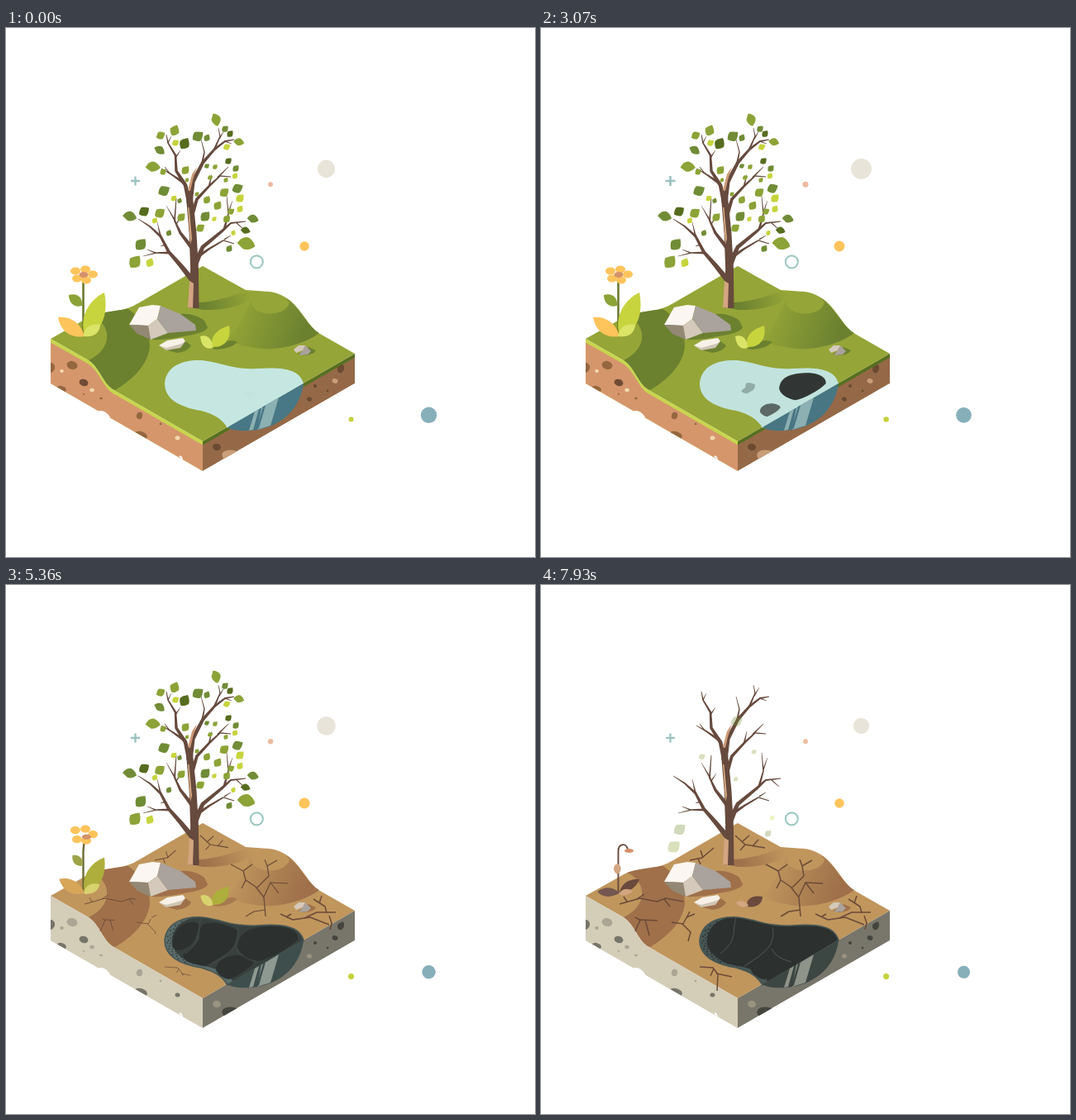
An HTML page for the animation above (8000 ms loop, 640 by 640 pixels).

```html
<!DOCTYPE html>
<html lang="en">
<head>
<meta charset="utf-8">
<title>Meadow turning to wasteland</title>
<style>
html, body { margin: 0; width: 100%; height: 100%; overflow: hidden; background: #fff; }
svg { display: block; width: 100vw; height: 100vh; }
</style>
</head>
<body>
<svg id="stage" viewBox="0 0 640 640"></svg>
<script>
const LOOP = 8000;
const stage = document.getElementById('stage');
const clamp = v => Math.max(0, Math.min(1, v));
const ramp = (t, from, to) => clamp((t - from) / (to - from));
const smooth = u => u * u * (3 - 2 * u);
const lerp = (a, b, u) => a + (b - a) * u;

function mix(a, b, u) {
  const rgb = h => [1, 3, 5].map(i => parseInt(h.slice(i, i + 2), 16));
  const to = rgb(b);
  return `rgb(${rgb(a).map((v, i) => Math.round(lerp(v, to[i], u)))})`;
}
function morph(a, b, u) {
  const to = b.match(/-?[\d.]+/g);
  let i = 0;
  return a.replace(/-?[\d.]+/g, n => lerp(+n, +to[i++], u).toFixed(2));
}

// healthy colour, dry colour
const land = {
  ground: ['#95a537', '#c0965d'], shade: ['#6b8130', '#9f704a'],
  soil: ['#d5966c', '#d4cdb8'], lip: ['#c8d54e', '#d4cdb8'],
  side: ['#956947', '#78766a'], sideLip: ['#56701f', '#78766a'],
  brown: ['#94673f', '#aaa594'], dark: ['#6f4b33', '#77756a'],
  cream: ['#f4d9ae', '#aaa594'], wasCream: ['#f4d9ae', '#77756a'], wasBrown: ['#94673f', '#77756a'],
  sideDark: ['#6b4a33', '#45453f'], sideLight: ['#c99e78', '#45453f'], sideDim: ['#6b4a33', '#9a9380']
};
// clear, spilled, stagnant
const pool = {
  water: ['#c6e7e1', '#8fa8a6', '#475654'],
  depth: ['#487785', '#42656b', '#3c4642'],
  stripe: ['#8cb1b3', '#8da5a3', '#8f948a']
};
const OIL = '#2c302f', BARK = '#664a3d';

const frontEdge = '54,376 L98,401 C114,410 117,432 132,439 L238,500';
const backEdge = 'L422,394 L379,369.5 C367,362 359,343 344,330 C329,317 308,319 290,317 L238,288 L172,326 C155,336 152,338 140,341 Q115,344 102,349Z';
const pondShape = 'M192,430 C194,408 215,401 237,402 C262,405 275,414 305,412 C333,410 355,412 360,430 L268,484 C262,474 254,468 236,463 C212,459 192,450 192,430Z';

const path = (d, fill, extra = '') => `<path d="${d}" fill="${fill}" ${extra}/>`;
const poly = (points, fill) => `<polygon points="${points}" fill="${fill}"/>`;
const oval = (x, y, rx, ry, fill, extra = '') =>
  `<ellipse cx="${x}" cy="${y}" rx="${rx}" ry="${ry}" fill="${fill}" ${extra}/>`;
const tint = name => `var(--${name})`;
const pebbles = list => list.map(([x, y, rx, ry, c]) =>
  oval(x, y, rx, ry, tint(c), `transform="rotate(15 ${x} ${y})"`)).join('');

const leftPebbles = pebbles([
  [54, 411, 5, 6, 'wasBrown'], [80, 408, 6.5, 5, 'brown'], [94, 429, 5.5, 4.2, 'dark'],
  [67.5, 415, 2.3, 2, 'cream'], [104, 438, 2.8, 2.2, 'cream'], [94, 443, 1.1, 1, 'brown'],
  [115, 448, 2, 1.2, 'brown'], [67, 437, 6, 4, 'wasBrown'], [161.5, 469, 3.6, 4.3, 'brown'],
  [187, 479, 1.4, 1.2, 'brown'], [163, 493, 8, 5, 'wasBrown'], [191, 486, 2, 2.6, 'soil'],
  [207.5, 496, 3, 2.5, 'wasCream']
]);
const rightPebbles = pebbles([
  [255, 507, 5, 4.2, 'sideDim'], [275, 519, 14, 8, 'sideLight'], [398, 427, 3.5, 2.8, 'sideLight'],
  [367, 449, 3, 2.6, 'sideDim'], [374, 433, 2.1, 2, 'sideDark'], [389, 439, 1.4, 1.4, 'sideDark'],
  [405, 412, 4, 5.5, 'sideDark']
]);

const blobs = [
  [316, 434, 'M280,436 C282,418 300,412 330,412.500 C345,414 354,420 353,429 C342,440 320,452 305,455 C290,452 280,444 280,436Z'],
  [278, 462, 'M254,464 C256,453 270,447 282,448 C295,450 300,454 299,458 C292,466 280,473 270,477 C262,476 254,470 254,464Z'],
  [252, 436, 'M240,410 C255,406 272,413 280,418 C279,432 276,440 268,446 C258,450 248,458 240,461 C225,459 214,455 214,448 C220,440 234,435 234,425 C234,416 236,412 240,410Z'],
  [217, 425, 'M201,435 C202,420 210,410 222,408 C232,407 235,410 233,415 C230,425 228,435 218,439 C210,443 202,443 201,435Z']
];
const seams = 'M236,403 C230,418 240,428 217,446 M280,414 C284,434 274,444 246,461 M279,440 Q284,451 303,456';

const cracks = [
  '332,398 347,405 368,402 391,411', '361,403 376,396 399,396', '388,397 386,389 372,380', '391,400 394,409 392,417',
  '379,385 382,376', '340,401 345,398',
  '272,338 287,346 290,357 302,365 312,378 314,401', '304,366 318,352 316,340 328,333', '312,377 320,360 341,361',
  '290,357 285,367', '314,393 300,395 290,401', '287,346 298,338', '320,360 330,373', '316,340 313,332',
  '235,303 247,314 271,318', '247,314 241,321', '256,316 263,308', '243,311 252,303',
  '180,333 195,330 209,318', '196,330 193,321', '190,331 193,338',
  '95,386 120,379 140,383 151,379 172,383', '116,380 125,374', '149,380 156,389', '104,383 100,377',
  '114,419 120,405 141,406', '126,405 131,424', '121,406 114,402',
  '158,408 172,410 180,395', '171,410 181,420 178,431', '176,402 186,398',
  '192,462 208,463 214,471 213,491', '212,470 231,474', '209,464 205,473'
];

// start width, end width, points
const branches = [
  [11, 8, '228,339 228,290 226,248 222,205'], [7, 1, '222,212 226,186 238,163 252,147 265,137 276,135'],
  [2.4, .6, '252,147 259,131 257,121'], [1.6, .5, '258,134 264,124'], [2.4, .6, '237,165 240,150 236,135'],
  [1.6, .5, '265,137 273,140'], [6, .8, '222,212 217,190 206,173 205,154 196,139 194,129'],
  [2, .5, '205,157 211,148'], [3.4, .7, '216,188 200,177 188,170'], [1.6, .5, '198,176 192,168'],
  [1.5, .5, '196,139 200,131'], [5, .8, '224,230 231,207 246,191 259,179 272,180'],
  [2, .5, '256,181 269,168'], [2, .5, '246,190 249,177'],
  [7, .8, '228,288 238,265 261,246 272,236 290,234'], [2.8, .7, '264,243 269,225 267,203'],
  [1.6, .5, '269,223 274,209'], [4, .8, '233,276 246,267 263,257 276,261'], [1.6, .5, '279,236 288,244'],
  [1.6, .5, '264,256 272,251'], [5, .8, '225,266 211,248 204,233 206,206'], [2, .5, '205,234 194,215'],
  [1.6, .5, '206,237 212,228'], [7, .8, '228,308 211,287 197,271 187,252 174,240 160,231'],
  [2, .5, '187,252 183,235'], [3, .7, '198,272 182,272 166,276'],
  [1.8, .5, '181,272 171,268'], [2, .5, '193,262 187,264']
];
function taper(w0, w1, text) {
  const pts = text.split(' ').map(p => p.split(',').map(Number));
  const left = [], right = [];
  pts.forEach(([x, y], i) => {
    const [ax, ay] = pts[Math.max(0, i - 1)], [bx, by] = pts[Math.min(pts.length - 1, i + 1)];
    const width = lerp(w0, w1, (i / (pts.length - 1)) ** .8);
    const k = width / 2 / Math.hypot(bx - ax, by - ay);
    left.push([x - (by - ay) * k, y + (bx - ax) * k]);
    right.unshift([x + (by - ay) * k, y - (bx - ax) * k]);
  });
  return poly(left.concat(right).map(p => p.map(v => v.toFixed(1))).join(' '), BARK);
}

// Leaves by start of fall: x, y, size, colour, and a tilt for the pointed ones
const leafColor = { g: '#718c36', m: '#8ca337', d: '#566c1f', l: '#c6d43d' };
const leafGroups = [
  [5460, '204,124,6,m 187,130,5,m 205,139,4,l 167,222,6,d 186,224,6,m 203,206,3.5,l 283,206,5,l 241,228,6,g 267,231,4.5,m 219,184,2.5,m 266,184,3,m'],
  [5800, '216,140,6.5,d 243,133,4,g 282,138,6.5,m,0 267,144,4,l 186,148,7,g,20 178,168,9,m,-10 150,228,8.5,g,0 264,199,5.5,m 269,161,4,d 278,170,4,g 252,231,3,l 291,261,11,m,0 256,215,5,m 283,219,4,l 197,248,3.5,g'],
  [6060, '254,111,8,m,60 280,194,6,g 191,197,6.5,g 290,245,6,d,0 299,231,7,g,0 235,242,5,m 265,122,4,g 212,229,5,m 271,128,4,d 217,172,5,m 277,179,3.5,l 243,208,4.5,m 180,233,3.5,l 174,284,5,l 210,209,3,g 247,181,3,m 272,222,4,m 243,167,3,g'],
  [6450, '232,131,6.5,g 190,174,3.8,m 253,168,3,m 231,201,2.8,m 163,262,7,g 156,283,7.5,m 270,267,4,g 275,248,3,l']
];
// Sideways travel of a falling leaf, one rule per group
const drifts = [
  u => -4.5 * Math.sin(u * 5.6),
  (u, x) => u * (x > 200 ? 8 : -3),
  (u, x, i) => u * (i % 2 ? -9 : 9),
  u => u * 5
];
const leaves = leafGroups.flatMap(([start, text], group) => text.split(' ').map((item, i) => {
  const [x, y, size, color, tilt] = item.split(',');
  return { x: +x, y: +y, size: +size, color: leafColor[color], tilt, start, shift: u => drifts[group](u, +x, i) };
}));
const roundLeaf = 'M.9,-.95 Q1.05,.4 .6,.85 Q-.3,1.1 -.9,.8 Q-1.1,-.1 -.7,-.75 Q0,-1 .9,-.95Z';
const pointedLeaf = 'M-1.1,-.1 Q-.5,-.9 .2,-.75 Q.8,-.4 1,.3 Q.2,.85 -.4,.6Z';

// fresh shape, wilted shape, fresh colour, wilted colour
const plants = [
  ['M95,372 C88,348 102,328 119,320 C124,345 117,368 95,372Z', 'M95,372 C97,362 105,355 119,356 C116,365 107,372 95,372Z', '#c7d43e', '#6a4a3c'],
  ['M63,350 C80,348 92,360 95,373 C80,376 66,368 63,350Z', 'M68,371 C78,364 88,365 95,373 C85,378 76,379 68,371Z', '#fdc45c', '#74574e'],
  ['M94,373 C94,362 103,357 114,359 C114,368 106,375 94,373Z', 'M94,374 C98,367 104,366 111,370 C107,375 100,377 94,374Z', '#dae467', '#d3a581'],
  ['M76,323 C88,320 93,328 92,336 C82,339 76,332 76,323Z', 'M93,337 C99,341 97,348 92,350 C86,346 87,338 93,337Z', '#8ca337', '#d3a581'],
  ['M249,386 C247,370 258,364 270,360 C273,375 266,387 249,386Z', 'M249,389 C248,378 258,375 268,377 C268,386 260,391 249,389Z', '#c7d43e', '#6a4a3c'],
  ['M235,373 C243,370 250,376 250,387 C242,390 236,384 235,373Z', 'M236,384 C243,380 249,384 251,388 C245,391 239,390 236,384Z', '#dae467', '#d3a581']
];
const petals = [[84, 294], [96, 292], [105, 298], [97, 305], [86, 303]];
const stem = ['M93.5,373 L93.5,322 C93.5,313 93.5,306 93.500,299', 'M93.5,373 L93.5,322 C93.5,313 103,311 105,320'];

const specks = Array.from({ length: 60 }, (_, i) => {
  const a = 1.5 + i * .057, depth = 2 + (i * 7 % 5) * 1.9;
  return oval((229 + (36 - depth) * Math.cos(a)).toFixed(1), (431 - (29 - depth) * Math.sin(a)).toFixed(1), 1, .9, OIL);
}).join('');

const fade = (id, x1, y1, x2, y2) => `<linearGradient id="${id}" gradientUnits="userSpaceOnUse" x1="${x1}" y1="${y1}" x2="${x2}" y2="${y2}">
  <stop stop-color="var(--shade)"/><stop offset="1" stop-color="var(--shade)" stop-opacity="0"/></linearGradient>`;

stage.innerHTML = `
<defs>
  ${fade('hillFade', 360, 372, 275, 343)}${fade('castFade', 240, 337, 296, 322)}
  <clipPath id="leftFace"><path d="M${frontEdge} V536 L54,430Z"/></clipPath>
  <clipPath id="rightFace"><path d="M238,500 L422,394 V430 L238,536Z"/></clipPath>
  <clipPath id="pond"><path d="${pondShape}"/></clipPath>
</defs>
<g id="dots"></g>
${path('M' + frontEdge + backEdge, tint('ground'))}
${path('M104,348 Q112,345 120,344 C135,342 143,340 148,340 C166,353 174,371 174,385 C172,407 154,425 132,438 C117,432 114,410 100,402 C130,388 128,358 104,348Z', tint('shade'))}
<g clip-path="url(#leftFace)">
  <rect x="54" y="370" width="184" height="170" fill="var(--lip)"/>
  ${path(`M${frontEdge} V560 H54Z`, tint('soil'), 'transform="translate(0 4.500)"')}${leftPebbles}
</g>
${path('M111,463.500 Q120,461 126,471 L120,474Z M209,518 Q213,516 214,523Z', '#fff')}
<g clip-path="url(#rightFace)">
  ${poly('238,500 422,394 422,430 238,536', tint('side'))}${rightPebbles}
  ${poly('238,500 422,394 422,398.5 238,504.500', tint('sideLip'))}
</g>
${path('M267,375 C284,364 288,342 300,325 L341,328 C358,342 366,362 379,369 C365,380 335,390 310,388 C290,386 275,382 267,375Z', 'url(#hillFade)')}
${path('M297,333 C296,323 306,318 318,319 C330,320 337,325 343,332 C340,344 322,348 309,344 C301,341 298,338 297,333Z', tint('ground'))}
${path('M228,339 L233,332 C255,331 275,324 293,318 L298,325 C288,337 260,342 238,341Z', 'url(#castFade)')}
${path('M158,369 L174,377 C195,378 207,374 220,372 C230,371 244,366 244,362 L240,354 C232,348 222,345 211,346Z', tint('shade'))}
${poly('149,359 161,338 177,335 187,336 183,352 172,360', '#fbf6f1')}
${poly('149,359 172,360 175,377 159,370', '#938874')}
${poly('172,360 183,352 196,369 175,377', '#d4c9ba')}
${poly('187,336 211,346 229,359 230,366 196,369 183,352', '#aaa29c')}
${path('M192,389 L207,393 Q221,391 224,384 L216,378Z', tint('shade'))}
${poly('185,384 195,378 214,375 217,379 209,386 193,389', '#f7f1e8')}
${poly('185,384 194,387 212,382 217,379 211,387 194,390', '#d0c5b4')}
${path('M353,395 Q370,398 375,390 L366,386Z', tint('shade'))}
${poly('348,389 354,384 362,384 359,390 351,393', '#d4c9ba')}
${poly('362,384 369,391 365,395 354,396 359,390', '#aaa29c')}
${path('M249,388 Q268,391 280,380 Q274,376 263,380Z', tint('shade'), 'id="sproutShade"')}
${path(pondShape, tint('water'))}
<g clip-path="url(#pond)">
  <g class="stagnant">${specks}${path(pondShape, OIL, 'transform="translate(9 -1)"')}</g>
  <g id="oil"></g>
  ${path(seams, 'none', 'class="stagnant" stroke="#434c4a" stroke-width="1.300"')}
</g>
${path(pondShape, 'none', 'id="rim" stroke="#475654" stroke-width="1.600"')}
<g id="fish" fill="#93bfc0"><path d="M-7,0 Q-1,-7 6,-.8 L9,-4 Q7,0 9,4 L6,.8 Q-1,7 -7,0Z"/></g>
${path('M268,483 L360,430 C356,460 335,480 305,486 C290,488 275,488 268,483Z', tint('depth'))}
${poly('301,464 306,461 299,486 294,487', tint('stripe'))}
${poly('309,459.5 330,447 320,481 304,486', tint('stripe'))}
${poly('311,458 314,456.5 306,484 303,486', tint('depth'))}
<g id="cracks" fill="none" stroke="#6c4a38" stroke-linejoin="bevel"></g>
<g>${branches.map(b => taper(...b)).join('')}
  ${poly('220,338 222,306 227,309 226,339', '#d3a581')}${poly('220,217 221.5,217 225,255 223,262', '#d3a581')}
  ${poly('220,196 225,177 231,168 226,184 223,197', '#d09a78')}</g>
<g id="leaves"></g><g id="plants"></g>`;

const byId = id => document.getElementById(id);
function set(el, attrs) {
  for (const key in attrs) el.setAttribute(key, attrs[key]);
}
function make(parent, tag, attrs) {
  const el = document.createElementNS('http://www.w3.org/2000/svg', tag);
  set(el, attrs);
  return byId(parent).appendChild(el);
}

// x, y, mean radius, swing, peak time, period, colour
const dots = [
  [387.5, 170.5, 11.1, 1.4, 3000, 10000, '#e9e4d9'], [511.5, 468.3, 8.7, 1.1, 1000, 13500, '#87afba'],
  [361, 264, 6.2, .5, 4300, 8000, '#fdc45c'], [320, 189.2, 3.2, .35, 3500, 8000, '#ecbba0'],
  [417.6, 473.6, 3.3, .3, 6500, 13000, '#c4d23c']
].map(d => ({ d, el: make('dots', 'circle', { cx: d[0], cy: d[1], fill: d[6] }) }));
const ring = { cx: 303.3, cy: 282.9, r: 7.5, fill: 'none', stroke: '#9fcac4', 'stroke-width': 2.1 };
make('dots', 'circle', ring);
const plus = make('dots', 'path', { d: 'M-5.5,0 H5.500 M0,-5.5 V5.500', stroke: '#99c2c0', 'stroke-width': 2.3 });

const stagnantEls = document.querySelectorAll('.stagnant');
const oilEls = blobs.map(b => make('oil', 'path', { d: b[2], fill: OIL }));
const crackEls = cracks.map(c => make('cracks', 'path', { d: 'M' + c, pathLength: 1 }));
const leafEls = leaves.map(l => make('leaves', 'path', { d: l.tilt ? pointedLeaf : roundLeaf, fill: l.color }));
const stemEl = make('plants', 'path', { fill: 'none' });
const plantEls = plants.map(() => make('plants', 'path', {}));
const petalEls = petals.map(() => make('plants', 'ellipse', { rx: 6, ry: 4.6, fill: '#fdc45c' }));
const core = make('plants', 'ellipse', { fill: '#d6926a' });

function draw(t) {
  const dry = smooth(ramp(t, 3350, 4450));
  const spill = ramp(t, 2750, 4500), rot = smooth(ramp(t, 4500, 5800));
  for (const name in land) stage.style.setProperty('--' + name, mix(...land[name], dry));
  for (const name in pool) {
    const [clear, oily, dead] = pool[name];
    stage.style.setProperty('--' + name, t < 4500 ? mix(clear, oily, spill ** 1.6) : mix(oily, dead, rot));
  }
  stagnantEls.forEach(el => set(el, { opacity: rot }));
  set(byId('rim'), { opacity: dry });

  for (const { d: [, , mean, swing, peak, period], el } of dots)
    set(el, { r: mean + swing * Math.cos(2 * Math.PI * (t - peak) / period) });
  set(plus, { transform: `translate(156.5 185) scale(${1.03 + .07 * Math.cos(2 * Math.PI * (t - 3000) / 8000)})` });

  set(byId('fish'), {
    transform: `translate(${295 - t * .0203} 443)`,
    opacity: lerp(.06, 1, ramp(t, 150, 900)) * (1 - ramp(t, 1600, 2300))
  });

  blobs.forEach(([x, y], i) => {
    const u = ramp(t, 2600 + i * 175, 3500 + i * 175), s = 1 - (1 - u) ** 2;
    set(oilEls[i], {
      transform: `translate(${x} ${y}) scale(${s}) translate(${-x} ${-y})`,
      opacity: Math.min(1, s * 1.25)
    });
  });

  crackEls.forEach((el, i) => {
    const start = i < 6 ? 3850 + i * 60 : 4500 + i * 14;
    const u = ramp(t, start, start + 700);
    set(el, { 'stroke-dasharray': `${u} 2`, 'stroke-width': 1.5 * ramp(t, start, start + 900), opacity: u > 0 ? 1 : 0 });
  });

  const wilt = smooth(ramp(t, 5000, 6050));
  plants.forEach(([fresh, dead, c0, c1], i) =>
    set(plantEls[i], { d: morph(fresh, dead, wilt), fill: mix(c0, c1, wilt) }));
  set(byId('sproutShade'), { opacity: 1 - wilt });
  set(stemEl, { d: morph(...stem, wilt), stroke: mix('#67762b', '#6a4a3c', wilt), 'stroke-width': lerp(2.5, 1.9, wilt) });
  const shed = ramp(t, 5250, 6350);
  petals.forEach(([x, y], i) => set(petalEls[i], {
    cx: x + (x - 94) * .15 * shed, cy: y + shed * (26 + i * 5), opacity: 1 - ramp(t, 5500, 6300)
  }));
  set(core, { cx: lerp(94, 106.5, wilt), cy: lerp(298.5, 321.5, wilt), rx: 5.5, ry: lerp(3.5, 2.6, wilt) });

  leaves.forEach((l, i) => {
    const u = ramp(t, l.start, l.start + 1580);
    const angle = +(l.tilt || i * 37 % 40 - 20) + u * 12;
    set(leafEls[i], {
      transform: `translate(${l.x + l.shift(u)} ${l.y + 36 * u}) rotate(${angle}) scale(${l.size * .95})`,
      opacity: 1 - ramp(u, .66, 1) ** 2
    });
  });
}

function tick() {
  draw(performance.now() % LOOP);
  requestAnimationFrame(tick);
}
tick();
</script>
</body>
</html>
```
